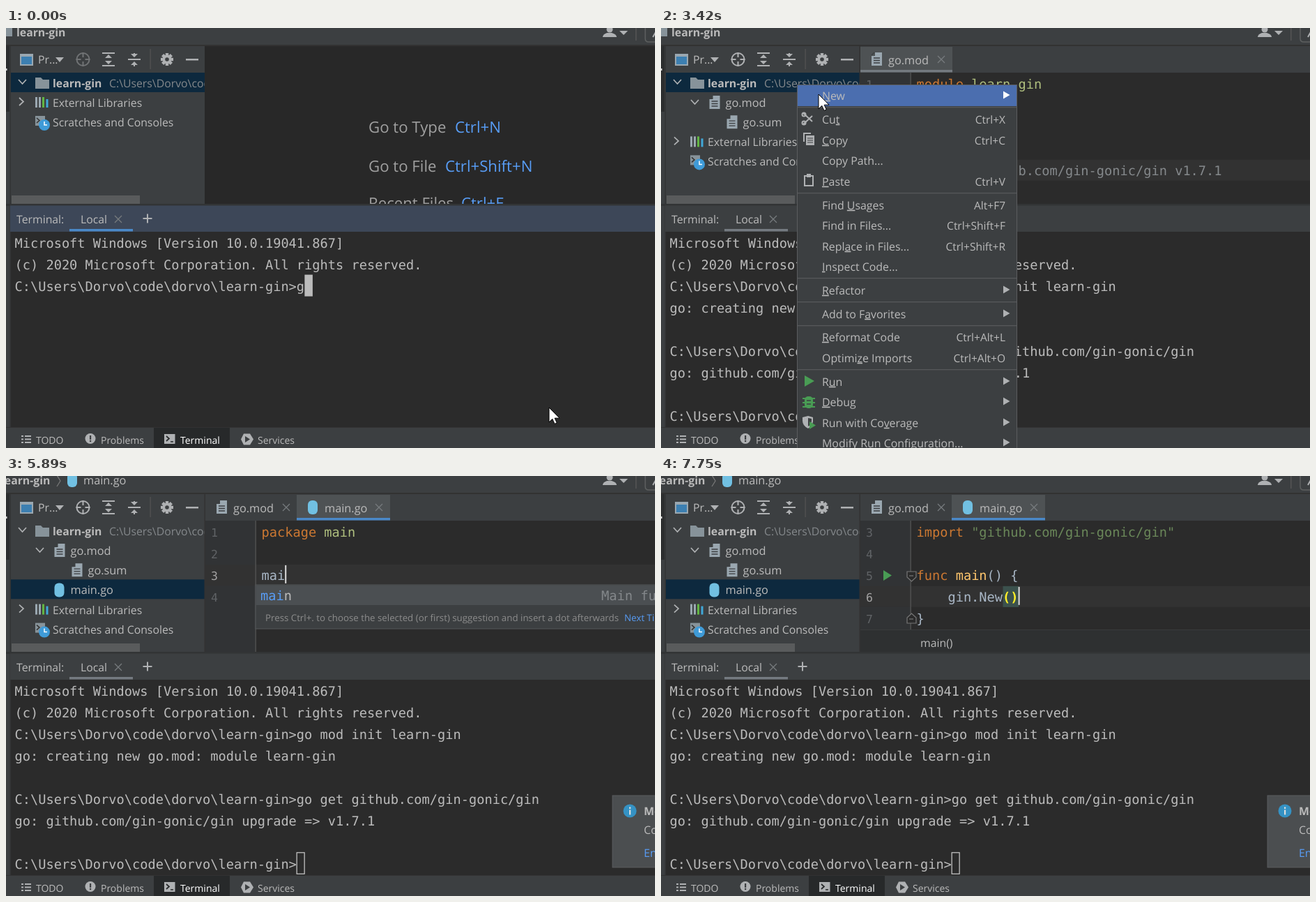
Recreate the animation shown at these times as an HTML page. Size 931 by 602 pixels, loop 8 s.

```html
<!DOCTYPE html>
<html lang="en">
<head>
<meta charset="utf-8">
<title>Go module setup</title>
<style>
  html, body { margin: 0; width: 100%; height: 100%; overflow: hidden; background: #3c3f41; }
  svg { display: block; }
  text { font: 15.8px "Open Sans", "Noto Sans", sans-serif; fill: #bbb; white-space: pre; text-rendering: geometricPrecision; }
  .mono { font: 18.67px "DejaVu Sans Mono", monospace; }
  .code { font: 18.67px "DejaVu Sans Mono", monospace; fill: #a9b7c6; }
  .num { font: 16.5px "DejaVu Sans Mono", monospace; fill: #606366; }
  .file { font-size: 16.3px; }
  .menu { font-size: 15.9px; }
  .keys { font-size: 15.5px; }
  .bar { font-size: 14px; }
  .tip { font-size: 13.3px; fill: #8c8c8c; }
  .big { font-size: 22.2px; fill: #a0a0a0; }
  .bold { font-weight: 700; }
  .dim { fill: #84888b; }
  .blue { fill: #589df6; }
  .kw { fill: #cc7832; }
  .pkg { fill: #afbf7e; }
  .lit { fill: #6897bb; }
  .str { fill: #6a8759; }
  .fn { fill: #ffc66d; }
  .brace { fill: #ffef28; font-weight: 700; }
  .lead { fill: #a4a3a3; }
  .key { text-decoration: underline; }
  .white { fill: #fff; }
  .ring { fill: none; stroke: #afb1b3; stroke-width: 2; }
</style>
</head>
<body>
<svg id="stage" width="931" height="602" viewBox="0 0 931 602"></svg>
<script>
const LOOP = 8000, CHAR = 11.24, ROW = 30.95;
const PROMPT = 'C:\\Users\\Dorvo\\code\\dorvo\\learn-gin>';
const LOG = [
  'Microsoft Windows [Version 10.0.19041.867]',
  '(c) 2020 Microsoft Corporation. All rights reserved.',
  PROMPT + 'go mod init learn-gin',
  'go: creating new go.mod: module learn-gin',
  '',
  PROMPT + 'go get github.com/gin-gonic/gin',
  'go: github.com/gin-gonic/gin upgrade => v1.7.1',
  ''
];
const REPO = 'github.com/gin-gonic/gin';

// Each entry changes part of the state from its time on.
const STEPS = [
  [0, { rows: 2, input: PROMPT + 'g', focus: true, selected: 0, mouse: [779, 544] }],
  [200, { rows: 3, input: '' }],
  [400, { rows: 5, input: PROMPT }],
  [1180, { input: PROMPT + 'go' }],
  [1380, { input: PROMPT + 'go get github.com/' }],
  [1580, { rows: 6, input: '' }],
  [2000, { rows: 7 }],
  [2220, { rows: 8, input: PROMPT }],
  [2620, { files: ['go.mod', 'go.sum'], mouse: [520, 370] }],
  [2820, { file: 'go.mod', selected: 1, focus: false, mouse: [126, 108] }],
  [3040, { selected: 0, mouse: [195, 81] }],
  [3240, { menu: true }],
  [3420, { hover: true, mouse: [226, 95] }],
  [3640, { submenu: true }],
  [3840, { subHover: true, mouse: [741, 97] }],
  [4040, { menu: false, dialog: true, name: '', mouse: null, beam: true }],
  [4260, { name: 'm', beam: false }],
  [4460, { name: 'mai' }],
  [4670, { name: 'main' }],
  [4870, { dialog: false, files: ['go.mod', 'go.sum', 'main.go'], file: 'main.go', selected: 3, typed: '' }],
  [5070, { crumb: true }],
  [5270, { note: true }],
  [5480, { typed: 'm' }],
  [5680, { typed: 'ma' }],
  [5890, { typed: 'mai' }],
  [6110, { typed: 'main' }],
  [6310, { body: true, typed: '' }],
  [6510, { typed: 'g' }],
  [6720, { typed: 'gi' }],
  [6930, { typed: 'gin' }],
  [7150, { typed: 'gin.' }],
  [7330, { typed: 'gin.Ne' }],
  [7550, { typed: 'gin.New()', done: true }],
  [7750, { imported: true }]
];

const rect = (x, y, w, h, fill, more = '') => `<rect x="${x}" y="${y}" width="${w}" height="${h}" fill="${fill}" ${more}/>`;
const path = (d, fill, more = '') => `<path d="${d}" fill="${fill}" ${more}/>`;
const stroke = (d, color = '#afb1b3', w = 2) => path(d, 'none', `stroke="${color}" stroke-width="${w}"`);
const dot = (x, y, r, fill) => `<circle cx="${x}" cy="${y}" r="${r}" fill="${fill}"/>`;
const ring = (x, y, r) => `<circle cx="${x}" cy="${y}" r="${r}" class="ring"/>`;
const text = (x, y, s, cls = '', more = '') => `<text x="${x}" y="${y}" class="${cls}" ${more}>${s}</text>`;
const span = (cls, s) => `<tspan class="${cls}">${s}</tspan>`;
const at = (x, y, s) => `<g transform="translate(${x} ${y})">${s}</g>`;
const cross = (x, y) => stroke(`M${x - 5} ${y - 5}l10 10m0-10l-10 10`, '#777b7e', 1.3);

const docIcon = (x, y) => at(x, y,
  path('M5 0H15V19H0V5H5Z', '#9aa7b0') + stroke('M0 4L4 0M3 8h9M3 11.5h9M3 15h9', '#3c3f41', 1.3));
const goIcon = (x, y) => rect(x - 7, y - 10, 14, 20, '#71c0e2', 'rx="6"');
const fileIcon = (name, x, y) => name === 'main.go' ? goIcon(x + 7, y) : docIcon(x, y - 10);
const chevron = (x, y, open) => stroke(open ? `M${x - 5} ${y - 3}l5.5 6 5.5-6` : `M${x - 3} ${y - 5}l6 5.5-6 5.5`, '#afb1b3', 1.7);

function topBar(s) {
  const user = dot(866, 2, 4.5, '#afb1b3') + path('M856 13q0-4 6-6h7q7 2 7 6zM880 4h12l-6 6z', '#afb1b3');
  const title = s.crumb
    ? text(-7, 12, 'learn-gin', 'bold') + stroke('M73 -1l5 8-5 8', '#777', 1.3) + goIcon(95, 6) + text(111, 12, 'main.go', 'file')
    : rect(0, 0, 9, 12, '#87939a') + text(15, 12, 'learn-gin', 'bold');
  return rect(0, 0, 931, 602, '#3c3f41') + title + user + rect(903, 0, 1.5, 18, '#555')
    + stroke('M917 0V15q0 5 5 5H931', '#5e6060', 1.5) + stroke('M928 13l5-9')
    + rect(0, 24, 931, 2, '#323232') + rect(0, 26, 5, 94, '#2c2e2f') + rect(0, 58, 1.5, 3, '#ddd') + rect(5.5, 26, 1.5, 546, '#323435');
}

function toolbar(active) {
  const gear = [0, 45, 90, 135].map(a => rect(-2.2, -9, 4.4, 18, '#afb1b3', `transform="rotate(${a})"`)).join('');
  const target = ring(110.5, 45, 9) + stroke('M110.5 35v7m0 6v7M100.5 45h7m6 0h7');
  return rect(20, 37, 19, 17, '#9aa7b0') + rect(22, 41, 15, 11, '#3c7fb1')
    + text(46, 51, 'Pr...') + path('M71 42h12l-6 7z', '#afb1b3')
    + `<g opacity="${active ? 1 : .45}">${target}</g>`
    + stroke('M138 36h18M138 54h18M175 45h18')
    + path('M147 38l5 5h-10zM147 52l5-5h-10zM184 42l5-5h-10zM184 48l5 5h-10z', '#afb1b3') + stroke('M184 36v3m0 13v3')
    + rect(206.5, 30, 1.2, 29, '#555') + at(231, 45, gear + dot(0, 0, 6.5, '#afb1b3') + dot(0, 0, 2.8, '#3c3f41'))
    + rect(258, 44, 18, 2.5, '#afb1b3');
}

function project(s) {
  const files = s.files || [];
  let out = toolbar(s.file) + rect(7, 64 + 28.1 * s.selected, 278, 28, '#0d293e');
  out += chevron(23, 77, true) + path('M42 71h8l3 3h9v13H42z', '#87939a')
    + text(67, 85, 'learn-gin', 'bold') + text(148, 85, 'C:\\Users\\Dorvo\\code\\dorvo', 'dim');
  files.forEach((name, i) => {
    const y = 107 + 28.2 * i, x = name === 'go.sum' ? 94.5 : 69.5;
    if (!i) out += chevron(48, y - 1, true);
    out += fileIcon(name, x, y) + text(x + 23, y + 6, name, 'file');
  });
  const y = 107 + 28.2 * files.length;
  out += chevron(22, y - 2, false) + rect(42, y - 8, 3, 15, '#9aa7b0') + rect(47, y - 8, 3, 15, '#9aa7b0')
    + rect(52, y - 8, 3, 15, '#62b543') + rect(57.5, y - 5, 3, 12, '#40a8d8') + text(67, y + 6, 'External Libraries');
  out += rect(42, y + 19, 14, 14, '#87939a') + stroke(`M44 ${y + 22}l4 3.5-4 3.5`, '#333', 1.5)
    + dot(55, y + 32, 8, '#3f9bd8') + stroke(`M55 ${y + 27}v5h4`, '#fff', 1.5) + text(67, y + 34, 'Scratches and Consoles');
  return out + rect(8, 240, 184, 12, '#595b5c');
}

function tab(name, x, w, current, lit) {
  return (current ? rect(x, 27, w, 36, '#4e5254') + rect(x, 60, w, 3.5, lit ? '#4a88c7' : '#747a80') : '')
    + fileIcon(name, x + 16, 45) + text(x + 40, 51.5, name, 'file') + cross(x + w - 16, 45);
}

function codeLines(s) {
  const kw = w => span('kw', w);
  if (s.file === 'go.mod') return [
    kw('module') + ' ' + span('pkg', 'learn-gin'), '', kw('go') + ' ' + span('lit', '1.15'), '',
    span('dim', `require ${REPO} v1.7.1`), ''];
  const head = s.imported
    ? [kw('import') + ' ' + span('str', `"${REPO}"`), '']
    : [kw('package') + ' ' + span('pkg', 'main'), ''];
  if (!s.body) return [...head, s.typed, ''];
  const call = s.typed.replace('()', span('brace', '()'));
  return [...head, kw('func') + ' ' + span('fn', 'main') + '() {', '    ' + call, '}'];
}

function welcome() {
  const hint = (y, label, x, keys) => text(520, y, label, 'big') + text(x, y, span('blue', keys), 'big');
  return rect(285, 26, 646, 227, '#282828') + hint(150, 'Go to Type', 644, 'Ctrl+N')
    + hint(205.5, 'Go to File', 630, 'Ctrl+Shift+N') + hint(259, 'Recent Files', 653, 'Ctrl+E');
}

function foldMark(y, dir) {
  return path(`M353 ${y}h13v${8 * dir}l-6.5 ${6 * dir}-6.5 ${-6 * dir}z`, '#2b2b2b', 'stroke="#777" stroke-width="1.2"')
    + stroke(`M356 ${y + 6 * dir}h6`, '#777', 1.2);
}

function editor(s) {
  if (!s.file) return welcome();
  const isMain = s.file === 'main.go', now = isMain ? (s.body ? 3 : 2) : 4, first = s.imported ? 3 : 1;
  const top = i => 65 + ROW * i;
  let out = rect(285, 26, 646, 38, '#3c3f41') + tab('go.mod', 286, 132, !isMain) + (isMain ? tab('main.go', 417, 134, true, true) : '')
    + rect(285, 64, 646, 189, '#2b2b2b') + rect(285, 64, 73, 189, '#313335')
    + rect(286, top(now), 645, 30, '#323232') + rect(357.5, 64, 1.3, 189, '#555');
  if (s.done) out += rect(490.5, top(3), 22.5, 30, '#3b514d');
  codeLines(s).forEach((line, i) => {
    out += text(294, top(i) + 22, first + i, i === now ? 'num lead' : 'num') + text(366.5, top(i) + 22, line, 'code');
  });
  if (s.body) {
    out += path('M319 135l12 7.5-12 7.5z', '#499c54') + foldMark(137, 1) + foldMark(211, -1)
      + rect(286, 220, 645, 33, '#2e3031') + rect(286, 220, 645, 1, '#393b3c') + text(372, 244.5, 'main()');
  }
  if (isMain) out += rect(366.5 + CHAR * (s.typed.length + (s.body ? 4 : 0)), top(now) + 1, 2, 26, '#ddd');
  return out + rect(284.5, 26, 1.5, 227, '#323232');
}

function terminal(s) {
  let out = rect(0, 252, 931, 3, '#323435') + rect(6, 254.5, 925, 37.5, s.focus ? '#3d4758' : '#3c3f41')
    + text(15, 279.5, 'Terminal:') + text(107, 279.5, 'Local') + cross(161, 274)
    + rect(91, 288, 91, 3.5, s.focus ? '#4a88c7' : '#747a80') + stroke('M196.5 273h13M203 266.5v13')
    + rect(7, 292, 924, 280, '#2b2b2b');
  const top = i => 291.7 + ROW * i;
  [...LOG.slice(0, s.rows), s.input].forEach((line, i) => { out += text(12.5, top(i) + 23.7, line, 'mono'); });
  const x = 12.5 + CHAR * s.input.length;
  return out + (s.focus ? rect(x, top(s.rows), 11.5, 31, '#bbb')
    : rect(x, top(s.rows) + .5, 11, 30.5, 'none', 'stroke="#ccc" stroke-width="1.2"'));
}

function bottomBar() {
  return rect(0, 572, 931, 30, '#3c3f41') + rect(0, 572, 931, 1, '#323232') + rect(212, 573, 109, 29, '#27292a')
    + stroke('M22 585h3m2 0h9M22 589.5h3m2 0h9M22 594h3m2 0h9') + text(43, 596, 'TODO', 'bar')
    + dot(121, 588.5, 7.5, '#afb1b3') + rect(120, 584, 2.2, 6, '#3c3f41') + rect(120, 591, 2.2, 2.2, '#3c3f41')
    + text(136, 596, 'Problems', 'bar') + rect(227, 582, 15.5, 14, '#afb1b3') + stroke('M230 585l4 3.5-4 3.5m6 1h4', '#27292a', 1.7)
    + text(250, 596, 'Terminal', 'bar white')
    + path('M341 581.5h9l5 8-5 8h-9l-4-8z', '#afb1b3') + path('M343 585l7 4.5-7 4.5z', '#3c3f41') + text(361, 596, 'Services', 'bar');
}

const notice = () => rect(870, 458, 70, 103, '#4b4e50', 'stroke="#5a5d5f"') + dot(895, 480, 9.5, '#3592c4')
  + rect(894, 478.5, 2.2, 7, '#ddd') + rect(894, 474.5, 2.2, 2.5, '#ddd')
  + text(915, 486, 'Module', 'bold') + text(915, 512.5, 'Configure') + text(915, 545.5, 'Enable', 'blue');

const MENU = [
  [97, '_New', '>'], [131, 'Cu_t', 'Ctrl+X'], [161, '_Copy', 'Ctrl+C'], [190, 'Copy Path...'], [220, '_Paste', 'Ctrl+V'],
  [254, 'Find _Usages', 'Alt+F7'], [283, 'Find in Files...', 'Ctrl+Shift+F'], [313, 'Repl_ace in Files...', 'Ctrl+Shift+R'],
  [342, '_Inspect Code...'], [376, '_Refactor', '>'], [410, 'Add to F_avorites', '>'], [443, '_Reformat Code', 'Ctrl+Alt+L'],
  [473, 'Optimi_ze Imports', 'Ctrl+Alt+O'], [507, 'R_un', '>'], [536, '_Debug', '>'], [566, 'Run with Co_verage', '>'],
  [595, 'Modify Run Configuration...', '>']
];
const SUBMENU = ['Go File', 'File', 'Scratch File', 'Directory', 'HTML File', 'Stylesheet', 'JavaScript File', 'EditorConfig File'];

const menuIcons = () => stroke('M204 122l13 12M204 138l13-12') + ring(205, 136, 2.5) + ring(205, 124, 2.5)
  + stroke('M205 163v-12h10') + rect(208, 154, 12, 14, '#afb1b3') + stroke('M210 158h8m-8 3h8m-8 3h8', '#3c3f41', 1)
  + stroke('M206 212h12v14h-12z') + rect(209, 209, 6, 5, '#afb1b3')
  + path('M206 498l14 8-14 8z', '#499c54')
  + stroke('M203 531h18M203 537h18M203 543h18', '#499c54') + rect(206, 528, 12, 17, '#499c54', 'rx="5"') + stroke('M209 534h6m-6 5h6', '#3c3f41', 1.3)
  + path('M203 558l8-2 7 2v6q-1 7-7 10-8-4-8-11z', '#afb1b3') + path('M211 559v12q5-3 5-8v-3z', '#3c3f41') + path('M213 564l9 5.5-9 5.5z', '#499c54');

function contextMenu(s) {
  let out = rect(195.5, 81.5, 315, 530, '#3c3f41', 'stroke="#5b5d5f"');
  if (s.hover) out += rect(196, 82, 314, 30, '#4b6eaf');
  for (const y of [113, 236, 358, 392, 426, 489]) out += rect(196, y, 314, 1.3, '#56585a');
  for (const [y, label, keys] of MENU) {
    out += text(231, y + 5.7, label.replace(/_(.)/, span('key', '$1')), 'menu');
    if (keys === '>') out += path(`M491 ${y - 6.5}l9.5 5.5-9.5 5.5z`, y < 100 && s.hover ? '#fff' : '#afb1b3');
    else if (keys) out += text(494, y + 5.7, keys, 'keys', 'text-anchor="end"');
  }
  out += menuIcons();
  if (!s.submenu) return out;
  out += rect(510.5, 81.5, 280, SUBMENU.length * 30 + 2, '#3c3f41', 'stroke="#5b5d5f"');
  if (s.subHover) out += rect(511, 82, 279, 30, '#4b6eaf');
  SUBMENU.forEach((label, i) => {
    out += (i ? docIcon(519, 88 + 30 * i) : goIcon(526, 97)) + text(546, 103 + 30 * i, label, 'menu');
  });
  return out;
}

function newFile(name) {
  return rect(437.5, 227.5, 465, 153, '#3c3f41', 'stroke="#646769"') + rect(438, 228, 464, 34, '#484b4d')
    + text(674, 251, 'New Go File', 'menu', 'text-anchor="middle"')
    + rect(438, 262, 464, 1.5, '#646769') + rect(438, 301, 464, 1.5, '#646769')
    + rect(438, 302.5, 464, 15, '#45484a') + rect(438, 317.5, 464, 31.5, '#4b6eaf')
    + goIcon(458.5, 282) + goIcon(458.5, 333) + goIcon(458.5, 364.5)
    + text(478, 289, name || 'Name', name ? 'menu' : 'menu dim')
    + (name ? '' : rect(476, 271, 1.5, 23, '#ccc'))
    + text(475, 341, 'Empty file', 'menu') + text(475, 372, 'Simple application', 'menu');
}

const hintBar = (x, y, hint, linkX) => text(x, y, hint, 'tip') + text(linkX, y, span('blue', 'Next Tip'), 'tip');

function mainPopup(typed) {
  return rect(358, 156, 580, 63, '#3c3f41', 'stroke="#55585a"') + rect(358.5, 157, 573, 28, '#4b4f52')
    + text(365, 178, span('blue', typed) + 'main'.slice(typed.length), 'mono') + text(854, 178, 'Main function', 'mono dim')
    + hintBar(372, 208, 'Press Ctrl+. to choose the selected (or first) suggestion and insert a dot afterwards', 887);
}

// kind, name, grey tail, result type
const SYMBOLS = [
  ['T', 'Accounts', REPO], ['C', 'AuthUserKey', `= "user" ${REPO}`],
  ['f', 'BasicAuth(accounts Accounts)', 'github.c…', 'HandlerFunc'], ['f', 'Bind(val interface{})', 'github.com/gin-…', 'HandlerFunc'],
  ['f', 'BasicAuthForRealm(accounts Accounts, realm string)'], ['C', 'BindKey', `= "_gin-gonic/gin/bindkey" ${REPO}`],
  ['C', 'BodyBytesKey', '= "_gin-gonic/gin/bodybyteskey"'], ['T', 'Context', REPO],
  ['f', 'CreateTestContext(w http.ResponseWriter) (c *Context)'], ['f', 'CustomRecovery(handle RecoveryFunc)', 'g…', 'HandlerFunc'],
  ['f', 'CustomRecoveryWithWriter(out io.Writer, handle RecoveryFunc)'], ['C', 'DebugMode', `= "debug" ${REPO}`]
];
const MATCHES = [['f', 'New()', REPO, '*Engine'], ['T', 'Negotiate', REPO]];
const TINT = { T: '#3a8fb0', C: '#b58a45', f: '#bd6b7c' };

function ginPopup(typed) {
  const dotted = typed.includes('.'), list = typed.length > 4 ? MATCHES : SYMBOLS;
  const x = dotted ? 439 : 394, hit = dotted ? typed.length - 4 : typed.length;
  const h = Math.min(324, list.length * 28.2);
  let rows = rect(0, 0, 560, 28.5, '#515558');
  list.forEach(([kind, name, tail = '', type], i) => {
    const y = 15 + 28.15 * i, label = (dotted ? '' : 'gin.') + name;
    rows += (kind === 'C' ? path(`M22 ${y - 11}l11 11-11 11-11-11z`, TINT.C) : dot(22, y, 10, TINT[kind]))
      + text(22, y + 4.5, kind, 'tip', 'text-anchor="middle" style="fill:#2b2b2b"')
      + text(39.5, y + 6.5, span('blue', label.slice(0, hit)) + label.slice(hit) + ' ' + span('dim', tail), 'mono')
      + (type ? text(915 - x, y + 5, type, 'dim') : '');
  });
  return rect(x, 187, 560, h + 36, '#45484a', 'stroke="#5a5d5f"')
    + `<svg x="${x + .5}" y="187.5" width="${931 - x}" height="${h}">${rows}</svg>`
    + rect(x + .5, 187.5 + h, 560, 35, '#3c3f41')
    + hintBar(x + 16, 210.5 + h, 'Press Ctrl+Space to see functions accepting the expression as the first argument', x + 517);
}

function pointer(s) {
  if (s.mouse) return at(...s.mouse, path('M0 0V21L4.8 16.4 8 23.4 11.3 22 8.2 15.2H15Z', '#fff', 'stroke="#000"'));
  return s.beam ? stroke('M740 85.5h5l1 1 1-1h5M740 107.5h5l1-1 1 1h5M746 86v21', '#fff', 1.8) : '';
}

function popup(s) {
  if (s.menu) return contextMenu(s);
  if (s.dialog) return newFile(s.name);
  if (!s.typed || s.done) return '';
  return s.body ? ginPopup(s.typed) : mainPopup(s.typed);
}

const draw = s => topBar(s) + project(s) + editor(s) + terminal(s) + bottomBar()
  + (s.note ? notice() : '') + popup(s) + pointer(s);

const stage = document.getElementById('stage'), start = performance.now();
let shown = -1;
function tick() {
  const t = (performance.now() - start) % LOOP;
  const step = STEPS.filter(([from]) => from <= t).length;
  if (step !== shown) {
    shown = step;
    stage.innerHTML = draw(Object.assign({}, ...STEPS.slice(0, step).map(([, change]) => change)));
  }
  requestAnimationFrame(tick);
}
tick();
</script>
</body>
</html>
```
